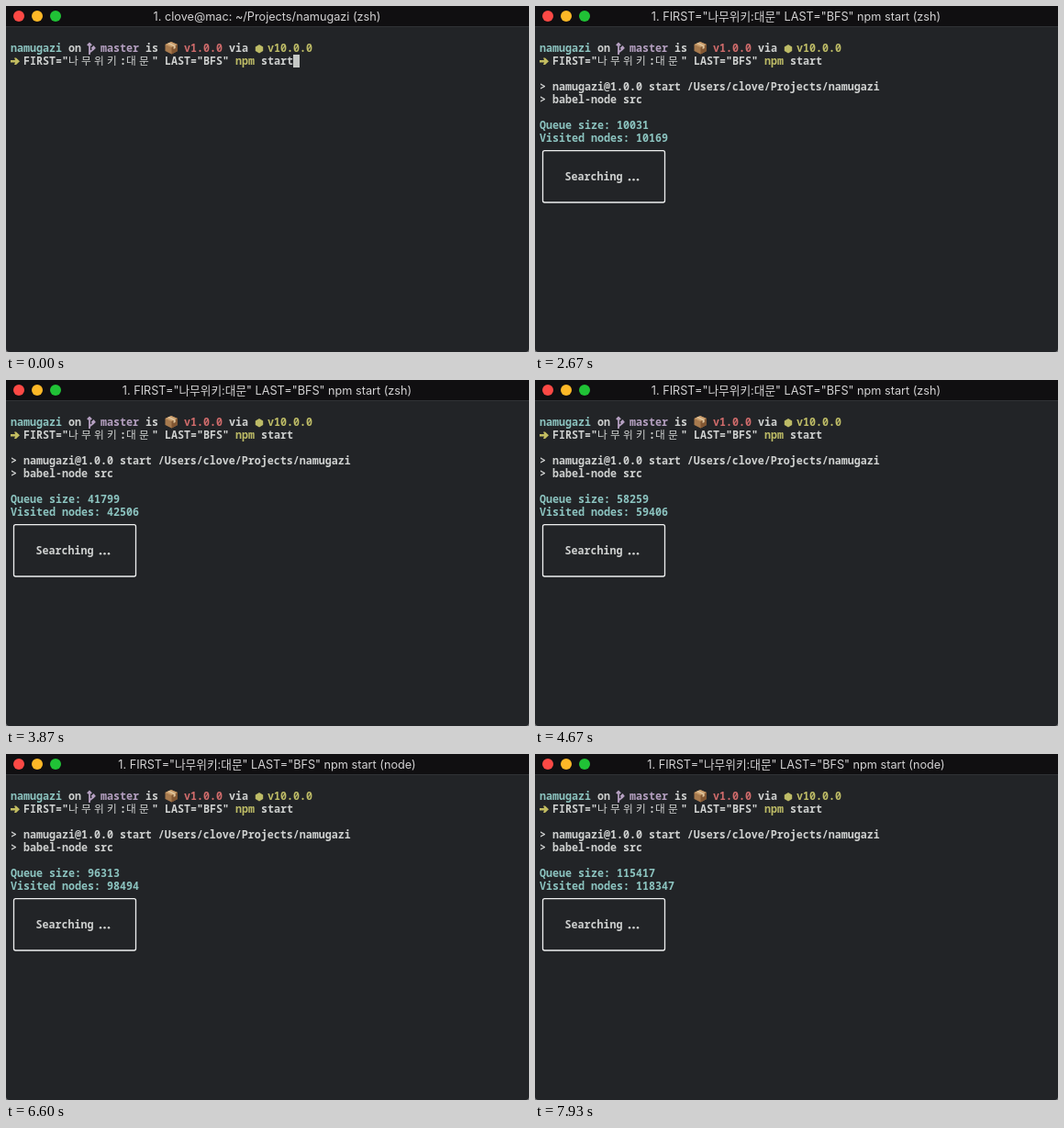
Animation of 570 by 377 pixels, one loop 8000 ms. Source, as an HTML page:

```html
<!DOCTYPE html>
<html lang="en">
<head>
<meta charset="utf-8">
<title>Terminal search</title>
<style>
  html, body { margin: 0; width: 100%; height: 100%; overflow: hidden; background: #77787a; }
  svg { display: block; width: 570px; height: 377px; }
  text { white-space: pre; }
  #title { font: 12.7px Inter, "Noto Sans CJK KR", "Noto Sans CJK", sans-serif; fill: #d3d2d3; text-anchor: middle; }
  .term text { font: 600 11.667px "Noto Sans Mono", "Noto Sans Mono CJK KR", "Noto Sans CJK KR", "Noto Sans CJK", monospace; fill: #cfd1d0; }
  .term .bold { font-weight: 800; }
  .term .hangul { font-family: "Noto Sans CJK KR", "Noto Sans CJK", sans-serif; font-weight: 500; }
  .term .cyan { fill: #8cc4c0; }
  .term .violet { fill: #b5a0c1; }
  .term .red { fill: #cf6b6b; }
  .term .green { fill: #bdbb66; }
</style>
</head>
<body>
<svg viewBox="0 0 570 377" xmlns="http://www.w3.org/2000/svg">
  <path d="M0 0H570V373Q570 377 566 377H4Q0 377 0 373Z" fill="#222427"/>
  <rect width="570" height="22" fill="#100f11"/>
  <path d="M0 22.5H570" stroke="#303235"/>
  <circle cx="14" cy="11" r="6" fill="#fc4945"/>
  <circle cx="34" cy="11" r="6" fill="#fdb827"/>
  <circle cx="54" cy="11" r="6" fill="#20c236"/>
  <text id="title" x="284.5" y="16"></text>

  <g class="term">
    <g id="prompt"></g>
    <path d="M91 40.5V53M95.5 44.5V47L91 50.5M88.8 43L91 40.8L93.2 43M93.3 46.5L95.5 44.3L97.2 46.5" fill="none" stroke="#b5a0c1" stroke-width="1.8"/>
    <g id="parcel">
      <path d="M173.5 42L180 39L187 42V49L180.5 52.5L173.5 49Z" fill="#a77a4e"/>
      <path d="M173.5 42L180 39L187 42L180.5 45Z" fill="#c99d6b"/>
      <path d="M180.5 45L187 42V49L180.5 52.5Z" fill="#815632"/>
      <path d="M176 40.9L178 40L184.7 43.1V46L182.6 47V44Z" fill="#dfc39b"/>
    </g>
    <path d="M276 42L280.2 44.4V49.1L276 51.5L271.8 49.1V44.4Z" fill="#bdbb66"/>
    <path d="M5 59H10L9 56.5H11L15 60.2L11 64H9L10 61.5H5Z" fill="#c3bd61"/>
    <g id="launch"></g>
    <g id="progress">
      <text id="queue" class="cyan" x="5" y="134"></text>
      <text id="visited" class="cyan" x="5" y="148"></text>
      <rect x="8.5" y="157.7" width="133" height="56.3" rx="2" fill="none" stroke="#f0f1f1" stroke-width="1.3"/>
      <text x="32.5" y="190">Searching</text>
      <g fill="#cfd1d0">
        <circle cx="103" cy="189.2" r="1.25"/>
        <circle cx="107.5" cy="189.2" r="1.25"/>
        <circle cx="112" cy="189.2" r="1.25"/>
      </g>
    </g>
    <rect id="cursor" width="7" height="14" fill="#c5c8c6"/>
  </g>
</svg>
<script>
const LOOP = 8000, STEP = 1000 / 15, CELL = 7, ROW = 14;
const $ = id => document.getElementById(id);

// Places text on the terminal grid.
function write(parent, col, row, content, style = "") {
  const node = document.createElementNS("http://www.w3.org/2000/svg", "text");
  node.setAttribute("x", 5 + col * CELL);
  node.setAttribute("y", 50 + row * ROW);
  node.setAttribute("class", style);
  node.textContent = content;
  $(parent).append(node);
}

write("prompt", 0, 0, "namugazi", "bold cyan");
write("prompt", 9, 0, "on", "bold");
write("prompt", 14, 0, "master", "bold violet");
write("prompt", 21, 0, "is", "bold");
write("prompt", 27, 0, "v1.0.0", "bold red");
write("prompt", 34, 0, "via", "bold");
write("prompt", 40, 0, "v10.0.0", "bold green");
write("prompt", 2, 1, 'FIRST="');
[..."나무위키"].forEach((c, i) => write("prompt", 9 + 2 * i, 1, c, "hangul"));
write("prompt", 17, 1, ":");
[..."대문"].forEach((c, i) => write("prompt", 18 + 2 * i, 1, c, "hangul"));
write("prompt", 22, 1, '"');
write("prompt", 24, 1, 'LAST="BFS"');
write("prompt", 35, 1, "npm", "green");
write("prompt", 39, 1, "start");
write("launch", 0, 3, "> namugazi@1.0.0 start /Users/clove/Projects/namugazi");
write("launch", 0, 4, "> babel-node src");

// [step, queue size, visited nodes]
const counts = [
  [35, 1, 1], [40, 10031, 10169], [58, 41799, 42506], [70, 58259, 59406],
  [85, 79150, 80828], [99, 96313, 98494], [119, 115417, 118347]
];

function countAt(step, column) {
  const i = Math.max(1, counts.findIndex(c => c[0] >= step));
  const a = counts[i - 1], b = counts[i];
  const k = (step - a[0]) / (b[0] - a[0]);
  return Math.round(a[column] + k * (b[column] - a[column]));
}

const command = '1. FIRST="나무위키:대문" LAST="BFS" npm start ';

function titleAt(t) {
  if (t < 930) return "1. clove@mac: ~/Projects/namugazi (zsh)";
  return command + (t < 4870 ? "(zsh)" : "(node)");
}

function cursorAt(t) {
  if (t < 930) return [44, 1];
  return t < 1400 ? [0, 2] : [0, 6];
}

const show = (id, on) => $(id).setAttribute("visibility", on ? "visible" : "hidden");

function draw(t) {
  const searching = t >= 2330;
  const [col, row] = cursorAt(t);
  $("title").textContent = titleAt(t);
  $("cursor").setAttribute("x", 5 + col * CELL);
  $("cursor").setAttribute("y", 39 + row * ROW);
  show("cursor", !searching);
  show("launch", t >= 1400);
  show("progress", searching);
  if (searching) {
    const step = Math.min(119, Math.floor((t + 4) / STEP));
    $("queue").textContent = "Queue size: " + countAt(step, 1);
    $("visited").textContent = "Visited nodes: " + countAt(step, 2);
  }
}

const start = performance.now();
function tick() {
  draw((performance.now() - start) % LOOP);
  requestAnimationFrame(tick);
}
tick();
</script>
</body>
</html>
```
